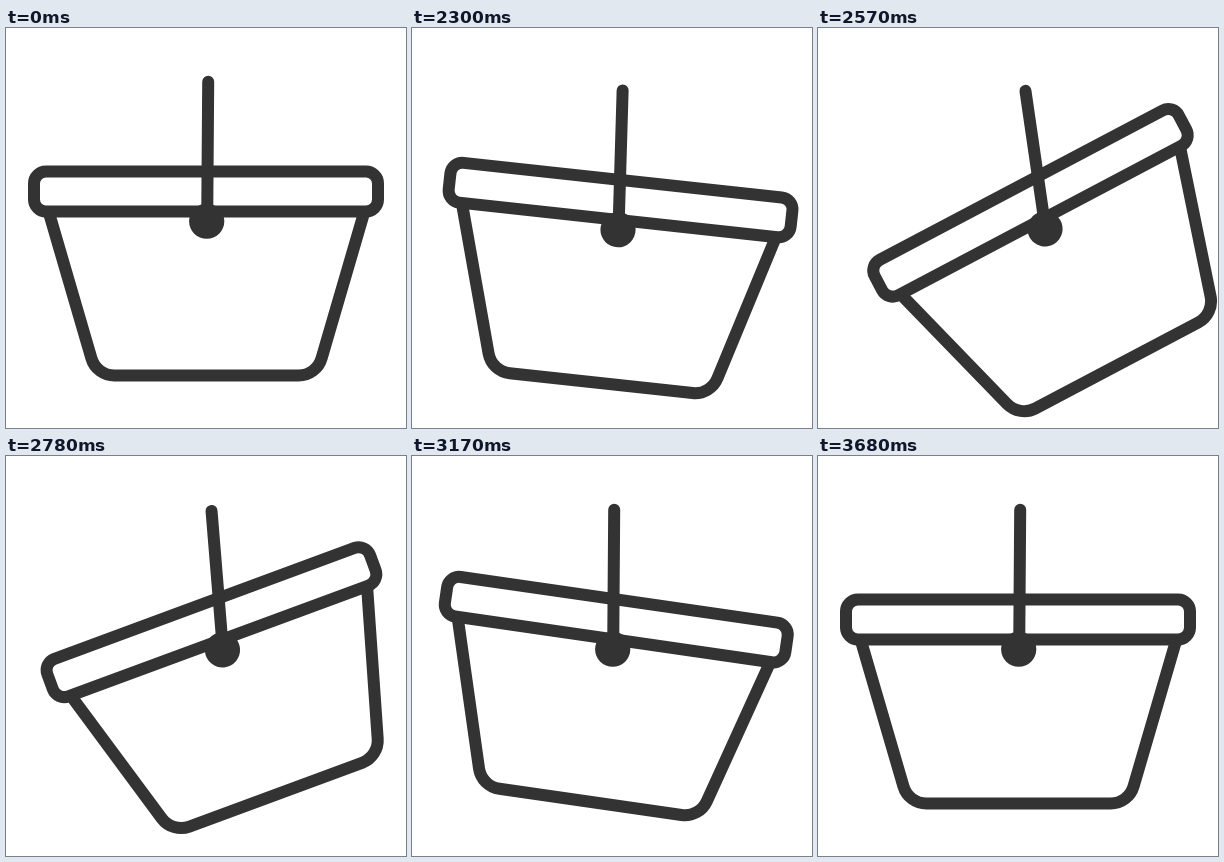
These frames come from a looping animation (400 px wide and 400 px high, 3830 ms). An HTML page:

```html
<!DOCTYPE html>
<html lang="en">
<head>
<meta charset="utf-8">
<title>Swinging basket</title>
<style>
  html, body { margin: 0; width: 100%; height: 100%; overflow: hidden; background: #fff; }
  svg { display: block; width: 100vw; height: 100vh; }
  .line { fill: none; stroke: #333; stroke-width: 12; stroke-linecap: round; stroke-linejoin: round; }
</style>
</head>
<body>
<svg viewBox="0 0 400 400">
  <g id="swing">
    <g id="basket">
      <rect class="line" x="28" y="143.4" width="344" height="40" rx="12"/>
      <path class="line" d="M43.6 187 L85.4 330.2 A24 24 0 0 0 108.5 347.5 H292.5 A24 24 0 0 0 315.6 330.2 L357.4 187"/>
    </g>
    <g id="handle">
      <path class="line" d="M202.2 53.8 L201.2 190"/>
      <circle cx="200.7" cy="193.2" r="17.6" fill="#333"/>
    </g>
  </g>
</svg>
<script>
  const LOOP = 3830, START = 2030, STEP = 30;
  const HINGE = "200.7 193.2";

  // Each track is a list of [ms, value], eased by a sine between points.
  const tracks = {
    tilt: [[2000, 0], [2230, 9.7], [2585, -28], [3230, 9], [3650, 0]],
    lean: [[2000, 0], [2200, 3.2], [2580, -8.7], [3030, 0]],
    x: [[2180, 0], [2585, 26.4], [3030, 0]],
    y: [[2000, 0], [2420, 10.5], [2850, 0]]
  };

  function valueAt(track, t) {
    const i = track.findIndex(point => point[0] > t);
    if (i <= 0) return 0; // at rest before the first and after the last point
    const [t0, a] = track[i - 1], [t1, b] = track[i];
    const u = (t - t0) / (t1 - t0);
    return a + (b - a) * (1 - Math.cos(Math.PI * u)) / 2;
  }

  const part = id => document.getElementById(id);
  const [swing, basket, handle] = ["swing", "basket", "handle"].map(part);
  const rotate = (el, deg) => el.setAttribute("transform", `rotate(${deg} ${HINGE})`);

  function draw(t) {
    // The motion advances in even steps after the pause.
    const held = t < START ? 0 : START + Math.floor((t - START) / STEP) * STEP;
    const at = name => valueAt(tracks[name], held);
    swing.setAttribute("transform", `translate(${at("x")} ${at("y")})`);
    rotate(basket, at("tilt"));
    rotate(handle, at("lean"));
  }

  const begin = performance.now();
  function tick() {
    draw((performance.now() - begin) % LOOP);
    requestAnimationFrame(tick);
  }
  tick();
</script>
</body>
</html>
```
